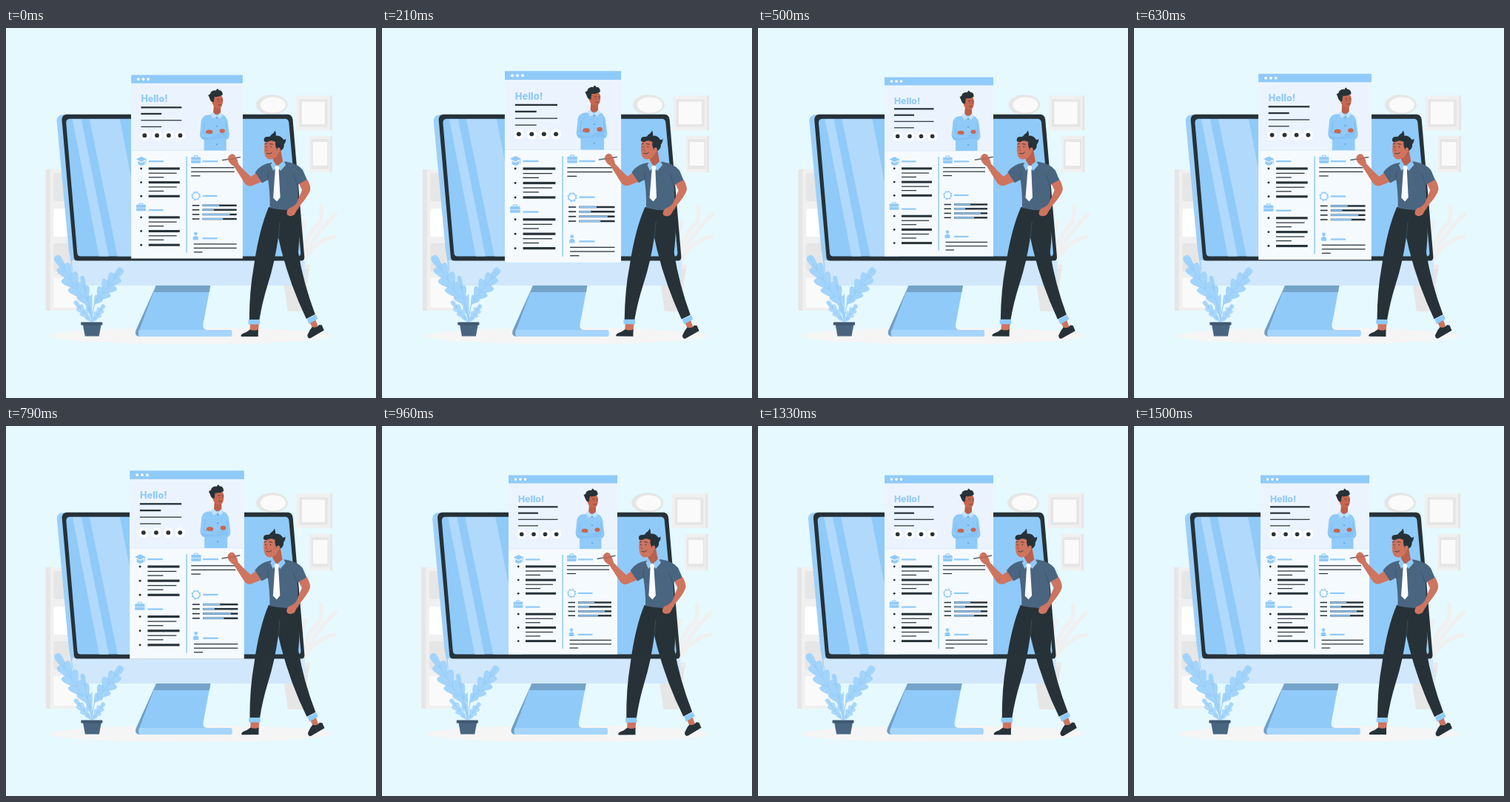
Write an HTML page that moves like this. It is 500 px wide and 500 px high and loops after 1.54 s.

```html
<!DOCTYPE html>
<html lang="en">
<head>
<meta charset="utf-8">
<title>Resume on a screen</title>
<style>
  html, body { margin: 0; width: 100%; height: 100%; overflow: hidden; background: #e5f9ff; }
  svg { display: block; width: 100vw; height: 100vh; }
  text { font: 800 12.2px Inter, "Open Sans", sans-serif; }
</style>
</head>
<body>
<svg viewBox="0 0 500 500">
  <ellipse cx="250" cy="416" rx="191" ry="11.3" fill="#f5f5f5"/>
  <g id="room"></g>
  <g id="page"></g>
  <g id="man"></g>
</svg>
<script>
const BLUE = '#90caf9', DARK = '#263238', SHIRT = '#4a6580', SKIN = '#ce745f',
      PALE = '#b1d9fb', GREY = '#e6e6e6', LIGHT = '#f0f0f0', SNOW = '#fafafa';

// Shape helpers
const rect = (x, y, w, h, fill, r = 0) =>
  `<rect x="${x}" y="${y}" width="${w}" height="${h}" rx="${r}" fill="${fill}"/>`;
const oval = (x, y, rx, ry, fill) =>
  `<ellipse cx="${x}" cy="${y}" rx="${rx}" ry="${ry}" fill="${fill}"/>`;
const dot = (x, y, r, fill) => oval(x, y, r, r, fill);
const path = (d, fill) => `<path d="${d}" fill="${fill}"/>`;
const line = (d, stroke, w = 1, cap = 'round') =>
  `<path d="${d}" fill="none" stroke="${stroke}" stroke-width="${w}" stroke-linecap="${cap}" stroke-linejoin="round"/>`;
const bar = (x1, x2, y, h = 1.2, fill = DARK) => rect(x1, y - h / 2, x2 - x1, h, fill);

// Lobed leaf from base to tip, with a centre vein
function leaf(x0, y0, x1, y1, w, n, fill = '#a3d4fb') {
  const dx = x1 - x0, dy = y1 - y0, len = Math.hypot(dx, dy);
  const at = (t, o) => [x0 + dx * t - dy / len * o, y0 + dy * t + dx / len * o].map(v => v.toFixed(1)).join(' ');
  const wide = t => w * Math.sin(Math.PI * (0.1 + 0.85 * t));
  const notch = (i, s) => at(i / n, i % n ? s * 0.5 * wide(i / n) : 0);
  const lobe = (i, s) => at((i + 0.1) / n, s * 1.6 * wide((i - 0.5) / n));
  let d = `M${x0} ${y0}`;
  for (let i = 1; i <= n; i++) d += `Q${lobe(i, 1)} ${notch(i, 1)}`;
  for (let i = n; i > 0; i--) d += `Q${lobe(i, -1)} ${notch(i - 1, -1)}`;
  let veins = `M${x0} ${y0}L${at(0.95, 0)}`;
  for (let i = 1; i < n; i++)
    for (const s of [1, -1]) veins += `M${at((i - 0.4) / n, 0)}L${at((i + 0.1) / n, s * 0.5 * wide(i / n))}`;
  return path(d, fill) + line(veins, '#8ec6f4', 0.6);
}

function shelf() {
  const cells = [[196, 38, GREY], [244, 38, SNOW], [291, 38, GREY], [338, 40, SNOW]];
  return rect(54, 191, 46, 191, LIGHT) + rect(54, 191, 6, 191, GREY) +
    cells.map(([y, h, c]) => rect(64.5, y, 32, h, c, 2)).join('') +
    path('M64.5 282V250Q66 243 73 244Q80 246 82 256V282Z', '#fff');
}

function frames() {
  return oval(359.5, 103.8, 21.5, 13.5, GREY) + oval(361, 104, 17, 10.5, SNOW) +
    rect(392.5, 91.5, 48.5, 46.5, LIGHT) + rect(438, 91.5, 3, 46.5, GREY) +
    rect(396.5, 96.5, 38.5, 37, GREY) + rect(400, 99.5, 31, 30.5, SNOW) +
    rect(410, 146, 31, 49, LIGHT) + rect(438, 146, 3, 49, GREY) +
    rect(412.5, 150, 24, 40.5, GREY) + rect(415, 154, 19.5, 32, SNOW);
}

function greyPlant() {
  const blades = ['M398 320Q404 280 424 264Q428 252 426 241', 'M398 320Q412 284 445 252',
                  'M400 318Q418 286 444 282', 'M396 318Q394 290 404 262'];
  return blades.map(d => line(d, LIGHT, 5.5)).join('') +
    path('M373 326H410L401 383H381Z', GREY) + rect(371, 319.5, 40, 6.5, '#ebebeb');
}

function monitor() {
  return path('M79 117Q68 117 69 127L85 300L92 342L104 330L92 125Z', '#9ccff9') +
    path('M89 314H404V342Q404 348 398 348H100Q93 348 92 341Z', '#d1e7fb') +
    path('M82 116.700H381Q387 117 387.800 124L403.500 309Q404 314.600 399 314.600H97Q92.500 314.600 92 310L75.800 125Q75.500 117 82 116.700Z', DARK) +
    path('M86 122.800H378Q382 123 382.500 128L398.500 304Q398.500 308.500 394.500 308.500H101Q97 308.500 96.500 304L81.500 128Q81.500 123 86 122.800Z', BLUE) +
    path('M90 123H102L139 308.500H126Z M113 123H154L190 308.500H151Z', PALE) +
    path('M203 348L176 408Q173 417 182 417H192L212 352Z', '#719fc4') +
    path('M203 348H276.500L266.500 401Q266 408 272 408H303Q305.500 408 305.500 411V415Q305.500 417 303 417H182Q178 417 180 409Z', BLUE) +
    path('M180 408H303Q305.500 408 305.500 411V415Q305.500 417 303 417H182Q178 417 180 408Z', '#a6d5fb') +
    path('M203 348H276.500L275 357H200Z', '#75a3c8');
}

function plant() {
  return line('M116 398Q115 380 106 368M116 398Q117 380 122 368M116 398V360', '#9ccff9', 1.2) +
    leaf(109, 374, 68, 308, 12, 5) + leaf(119, 374, 157, 325, 11.5, 5) +
    leaf(115, 390, 103, 335, 6.5, 4) +
    leaf(115, 397, 93, 369, 6, 4, '#add9fc') + leaf(117, 397, 133, 374, 6, 4, '#add9fc') +
    path('M104 400H129L126 416.500H107Z', SHIRT) + rect(101.5, 397.5, 29, 4, '#3f5870', 0.5);
}

const bag = (x, y) => line(`M${x + 4} ${y + 3}V${y + 0.6}H${x + 8.500}V${y + 3}`, BLUE) +
  rect(x, y + 2.4, 12.6, 8.2, BLUE, 0.8) + bar(x, x + 12.6, y + 6.6, 0.7, '#e8f4fe');

function portrait() {
  const face = '#c8674f';
  return path('M280 104H289V119L284 121L279 119Z', '#bb5f4a') +
    path('M276 119Q266 118 263.500 126L261.500 145Q263 152 267 152L267 166H296.500V152Q300.500 151 300.500 145L298 126Q295 119 289 118Z', BLUE) +
    path('M275 118L279 115.500L284 121L289 115.500L292 119L288 124L284 121L279 124Z', '#c3e2fc') +
    path('M278 95Q280 92 286 92Q292 93 292 100Q291.500 110 286.500 110.500Q279 110 277.500 102Z', face) +
    path('M275.500 100Q274 96 272.500 93Q276 92 276 89Q280 86 283 87Q283 85 285 84.500Q286 87 289 87Q292 89 291.500 93Q286 96 281 95Q280 98 280 102Q277 103 275.500 100Z', DARK) +
    line('M284.500 98.700L286.500 98.300M289.500 98.500L291 99M286 106Q288 107 289.500 105.500', DARK, 0.6) +
    dot(286, 101, 0.5, DARK) + dot(290, 101, 0.5, DARK) +
    path('M262 146Q272 151 284 147L296 144L297 150L268 152Q263 151 262 146Z', '#86c2f4') +
    oval(274, 141.5, 4.5, 2.8, face) + oval(291, 140.2, 3.6, 2.8, face) +
    line('M268 130L266 143L279 145M296 130L297 143L283 146', '#74b3e8', 0.7) +
    [123, 134, 158].map(y => dot(284, y, 0.9, '#5896cf')).join('');
}

function listBlock(y) {
  return [0, 18.2, 36.4].map((o, i) => dot(184.2, y + o, 1.4, DARK) + bar(194, 235, y + o, 3) +
    (i < 2 ? bar(194, 231, y + o + 6.1) + bar(194, 214, y + o + 11.5) : '')).join('');
}

function resume() {
  const badges = [188.7, 205, 220.5, 235.7];
  const skills = [[238.5, 287], [244.3, 280], [250.4, 301], [256.3, 292]];
  return rect(171, 66.5, 147, 242, '#f5faff') + rect(171, 77.5, 147, 88.5, '#ebf4fe') +
    bar(171, 318, 166, 0.7, '#d5e7f8') + rect(171, 66.5, 147, 11, BLUE) +
    [180.5, 187, 193.5].map(x => dot(x, 72.1, 1.8, '#fff')).join('') +
    `<text x="184" y="102.500" fill="${BLUE}">Hello!</text>` +
    bar(184, 237.5, 109.3, 2.2) + bar(184, 211, 117.7, 2.2) + bar(184, 237.5, 126.3) + bar(184, 211, 134.8) +
    badges.map(x => dot(x, 146.2, 6.4, '#fff') + dot(x, 146.2, 2.8, DARK)).join('') +
    portrait() +
    // Left column
    path('M177.500 177.500L184.500 174L191.500 177.500L184.500 181Z', BLUE) +
    path('M180 180L184.500 182.300L189 180V184Q184.500 187.500 180 184Z', BLUE) +
    line('M190.300 178V183.500', BLUE, 0.9) +
    bar(194, 213.5, 180.4, 2.2, BLUE) + listBlock(189.9) +
    bag(177.7, 235.2) + bar(194, 213.5, 244.6, 2.2, BLUE) + listBlock(254.2) +
    bar(243.4, 244.8, 237.5, 127, BLUE) +
    // Right column
    bag(250, 172.3) + bar(265, 285, 180.4, 2.2, BLUE) +
    bar(250, 307, 188.7) + bar(250, 307, 194.1) + bar(250, 262, 199.5) +
    `<circle cx="256.300" cy="226" r="4.600" fill="none" stroke="${BLUE}" stroke-width="1.300"/>` +
    `<circle cx="256.300" cy="226" r="5.600" fill="none" stroke="${BLUE}" stroke-width="1.200" stroke-dasharray="2.200"/>` +
    bar(265, 284.5, 226, 2.2, BLUE) +
    skills.map(([y, x]) => bar(251.5, 261, y, 1.5) + bar(265, 310, y, 2.4) + bar(265.3, x, y, 1.8, BLUE)).join('') +
    dot(256, 275.6, 2.3, BLUE) + path('M252.500 284V281Q253 278.600 256 278.600Q259 278.600 259.500 281V284Z', BLUE) +
    bar(265, 284.5, 281.9, 2.2, BLUE) +
    bar(253.5, 310, 289.4) + bar(253.5, 310, 294.7) + bar(253.5, 265, 300);
}

function person() {
  return path('M330 399H342L341 410H330Z M410 396L418 393L422 404L415 407Z', SKIN) +
    path('M318 415Q319 413 325 411L330 407.500Q336 410 341 407.500V417H318.500Q317 416.500 318 415Z', DARK) +
    path('M407.500 415Q409 412 411 408L414 404Q420 406 423.500 401L427 401.500L430 408.500L412 419Q408 420.500 407.500 415Z', DARK) +
    // Trousers and cuffs
    path('M355 242L396 245Q398 275 395 303Q402 345 418 387L406 393Q384 347 372 300L368 283Q363 318 354 346Q346 372 342.500 395H329Q329 355 335 322Q342 272 355 242Z', DARK) +
    line('M368 283L370 262', '#455a64', 0.7) +
    rect(327.8, 394, 15.5, 6.5, BLUE, 1) + path('M407 393L419 387.500L421.500 393L409.500 400Z', BLUE) +
    // Pen and raised arm
    line('M292.500 178.700L316 174.800', '#66757f', 1.8) +
    path('M340 194L331 201Q322 193 314 184Q313 178 310 174Q309 170 304 170.500Q299 173 300 178Q302 184 308 187L322 209Q327 216 334 212.500L350 206Z', SKIN) +
    line('M301 178L312 175.800', '#a95a49', 0.8) +
    // Shirt
    path('M358 182L378 180.500Q394 183 401 192L407 206L394 212L395.500 245Q376 248 356.500 243Q357 225 354 205L346 209.500L336.500 195Q344 184 358 182Z', SHIRT) +
    line('M354 205Q353 198 355 194M393 212Q391 202 388 198', '#3a5068', 0.8) +
    path('M396 210.500L407 204.500Q412 214 411 219Q409 226 398 239Q394 244 390 252Q385 256 380 252.500Q378 248 382 244Q390 241 393 236L400 219Z', SKIN) +
    // Neck, collar, tie
    path('M360 170L371 164L374 181L366 187L361 181Z', '#b9614e') +
    path('M361 179L366 187L375 179.500L378 185L371 193L366 187L361 193L357.500 185Z', BLUE) +
    path('M363 187.500L366 185.500L369.500 188L368.500 193L370.500 229L366 234.500L361 229.500L363.500 193Z', '#fafcff') +
    // Head
    path('M350 153Q357 148 365 151Q370 157 369 166Q367 176 358 177.500Q351.500 178 349.500 171Q347.500 162 350 153Z', SKIN) +
    path('M348.500 153Q347.500 147 353 147Q357 147.500 358 144.500Q362 142 363.500 138.500Q365 143 364.500 145.500Q371 145 374 150Q376 152 378 149.500Q378 155 375.500 157Q376 163 371.500 165.500L367 166Q363 160 364 154Q359 151 355 153Q352 155 348.500 153Z', DARK) +
    oval(368.3, 164.5, 2.3, 3, SKIN) +
    line('M349.500 157L352 156.200M356 156.500L360 157.200M352.500 169.500Q356 171.500 359 168.500', DARK, 0.8) +
    line('M353 160L351.500 165.500L354 166', '#a95040', 0.7) +
    dot(351, 160.2, 0.7, DARK) + dot(358, 160.5, 0.7, DARK);
}

const room = document.getElementById('room'), page = document.getElementById('page'), man = document.getElementById('man');
room.innerHTML = shelf() + frames() + greyPlant() + monitor() + plant();
page.innerHTML = resume();
man.innerHTML = person();

// Steps as [progress, value]
const shake = [[0, 0], [.1, -1], [.2, 2], [.3, -4], [.4, 4], [.5, -4], [.6, 4], [.7, -4], [.8, 2], [.9, -1], [1, 0]];
const beat = [[0, 1], [.1, 1.1], [.3, 1], [.4, 1], [.5, 1.1], [.6, 1], [1, 1]];
const sway = [[0, 0], [.25, 1], [.75, -1], [1, 0]];

function sample(steps, p) {
  const i = Math.max(1, steps.findIndex(s => s[0] >= p));
  const [p0, v0] = steps[i - 1], [p1, v1] = steps[i];
  return v0 + (v1 - v0) * (p - p0) / (p1 - p0);
}

const LOOP = 1540, TICK = 1000 / 24, LEAD = 38, CYCLE = 1512;

function draw() {
  const t = performance.now() % LOOP;
  const tick = Math.min(36, Math.floor((t + 4) / TICK));
  const p = Math.min(1, (tick * TICK + LEAD) / CYCLE);
  room.setAttribute('transform', `translate(${sample(shake, p)} 0)`);
  page.setAttribute('transform', `translate(244.500 187.500) scale(${sample(beat, p)}) translate(-244.500 -187.500)`);
  man.setAttribute('transform', `rotate(${sample(sway, p)} 361 279.500)`);
  requestAnimationFrame(draw);
}
draw();
</script>
</body>
</html>
```
